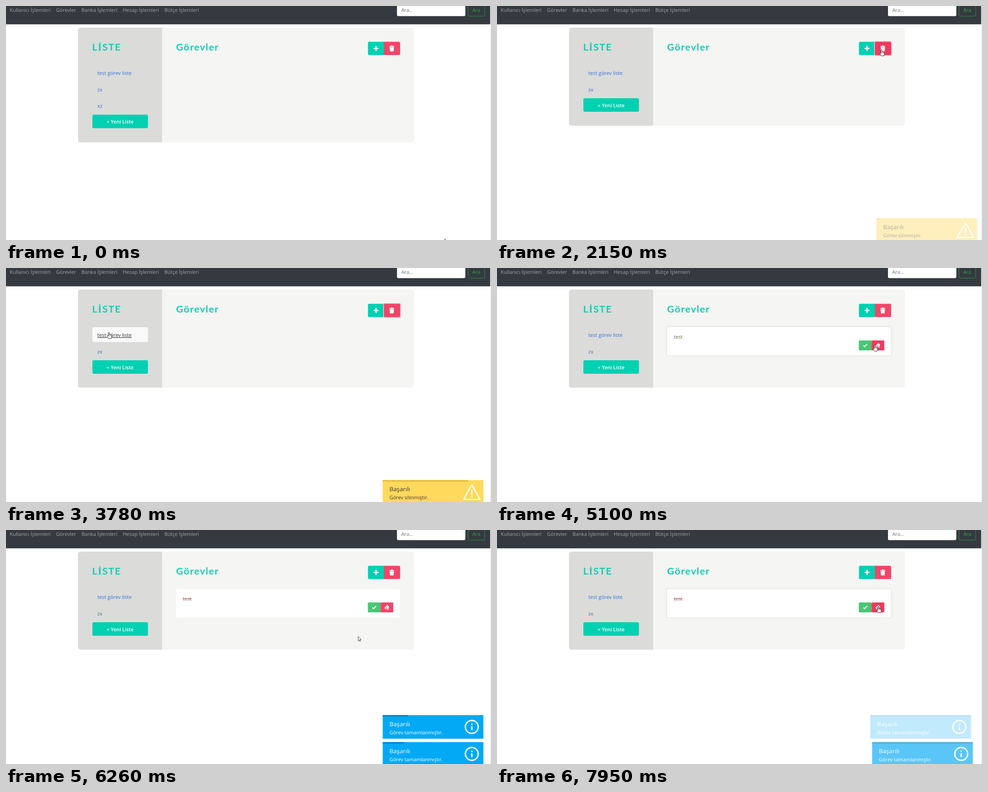
Recreate the animation shown at these times as an HTML page. Size 1078 by 520 pixels, loop 8000 ms.

```html
<!DOCTYPE html>
<html lang="tr">
<head>
<meta charset="utf-8">
<title>Görevler</title>
<style>
html, body { margin: 0; width: 100%; height: 100%; overflow: hidden; background: #fff; }
svg { display: block; font: 11.2px "Open Sans", sans-serif; }
.nav { fill: #a2a5a8; }
.head { font: 700 21.6px Lato, sans-serif; letter-spacing: 1.5px; fill: #13cdb3; }
.serif { font-family: "Liberation Serif", serif; }
.item { fill: #3273dc; font-size: 11.35px; }
.item rect { fill: none; }
.item.over text { fill: #363636; text-decoration: underline; }
.item.over rect { fill: #f9f9f9; }
.item.dim text { fill: #4270a8; }
.white { fill: #fff; }
.line { fill: none; stroke: #fff; }
.teal { fill: #00d1b2; }
.red { fill: #f14668; }
.green { fill: #48c774; }
.teal.over { fill: #00c4a7; }
.red.over { fill: #f03a5f; }
.green.over { fill: #3ec46d; }
.done { fill: #b0656c; text-decoration: line-through; }
.open { fill: #4d7340; }
.title { font-size: 13.5px; }
.msg { font-size: 11.1px; }
.warn { fill: #ffd95c; }
.warn .bar { fill: #e9bd40; }
.warn text { fill: #3a3a33; }
.info { fill: #03a9f4; }
.info .bar { fill: #0288d1; }
.info text { fill: #fff; }
</style>
</head>
<body>
<svg width="1078" height="520" viewBox="0 0 1078 520">
  <rect width="1076.5" height="40.7" fill="#343a40"/>
  <rect x="1076.5" width="1.5" height="520" fill="#ececec"/>
  <text class="nav" x="8.3" y="13">Kullanıcı İşlemleri<tspan dx="12">Görevler</tspan><tspan dx="12">Banka İşlemleri</tspan><tspan dx="12">Hesap İşlemleri</tspan><tspan dx="12">Bütçe İşlemleri</tspan></text>
  <rect class="white" x="869" y="-6" width="152" height="28.5" rx="3"/>
  <text x="878.5" y="13" fill="#6c757d">Ara...</text>
  <rect x="1026.9" y="-6" width="37" height="28.5" rx="3" fill="none" stroke="#28a745" stroke-width=".8"/>
  <text x="1036.5" y="13" fill="#28a745">Ara</text>

  <rect id="panel" x="160" y="48" width="747" rx="6" fill="#f5f5f3"/>
  <path id="side" fill="#dbdbd9"/>
  <text class="head" x="191.5" y="99">L<tspan class="serif">İ</tspan>STE</text>
  <text class="head" x="378" y="99">Görevler</text>
  <g id="list"></g>
  <g id="add">
    <rect class="teal" x="192" y="241.5" width="123.5" height="30" rx="3"/>
    <text class="white" x="253.7" y="261" text-anchor="middle" font-size="11.1" font-weight="600">+ Yeni Liste</text>
  </g>

  <path id="plus" class="teal" d="M840 79.5H807.5a3 3 0 0 0-3 3V106a3 3 0 0 0 3 3H840Z"/>
  <path class="line" stroke-width="2.6" d="M817 94.2H828M822.5 88.7V99.7"/>
  <rect id="ring" x="838.3" y="78" width="39.5" height="33" rx="3" fill="#f7bcc8"/>
  <path id="trash" class="red" d="M840 79.5H873a3 3 0 0 1 3 3V106a3 3 0 0 1-3 3H840Z"/>
  <path class="white" d="M852 89h3.2l.8-1.2h3l.8 1.2H863v1.7H852ZM852.7 91.6H862.3L861.7 99.6q-.1 1.4-1.4 1.4H854.7q-1.3 0-1.4-1.4Z"/>

  <g id="task">
    <rect id="glow" x="375" y="128.5" width="503.5" height="68" rx="6" fill="#ececeb"/>
    <rect class="white" x="378" y="131.5" width="497.7" height="62.8" rx="4"/>
    <text id="name" x="393" y="157">test</text>
    <rect id="check" class="green" x="804.3" y="161" width="28.5" height="22" rx="1.5"/>
    <path class="line" stroke-width="2" d="M814.3 172.2L817 175L822.8 168.8"/>
    <rect id="erase" class="red" x="832.5" y="161" width="28.3" height="22" rx="1.5"/>
    <path class="white" d="M841.5 172.6L847 167.2q.8-.7 1.6 0l2.7 2.7q.7.8 0 1.5L848 174.8H851.5V176.3H844.3L841.5 173.8Z"/>
    <path class="red" d="M843.3 173.4L845 171.8L847.2 174L846.2 174.9H844.7Z"/>
  </g>
  <g id="toasts"></g>
  <g id="cursor" stroke-linejoin="round">
    <path id="arrow" fill="#fff" stroke="#333" stroke-width=".9" d="M.4.3V10L2.6 8L4.1 11.4L5.7 10.7L4.2 7.4H7.2Z"/>
    <g id="hand" fill="#fff" stroke="#222">
      <path d="M-1.5 1.2C-1.5-.4 1-.4 1 1.2V5C3 4.5 6 5.2 6 7V10C6 12 5 12.3 4.6 13.8H-.8C-1.5 12-4 10-4 8.5C-4 7.2-2.4 7.2-1.5 8.6Z"/>
      <path fill="none" stroke-width=".5" d="M1 5V8M2.8 5.5V8M4.5 6V8"/>
    </g>
  </g>
</svg>
<script>
const LOOP = 8000, DELETED = 2020, SELECTED = 3900, DONE = 5690;
const ROW = 36.5, SHOW = 300, STAY = 2000, HIDE = 280, SHIFT = 10;

// Pointer moves: each eases to its point, rising by lift on the way
const home = { x: 975, y: 517 };
const moves = [
  { from: 60, to: 200, x: 199, y: 218, lift: 0 },
  { from: 960, to: 1570, x: 855, y: 97, lift: 48 },
  { from: 2650, to: 3740, x: 229, y: 143, lift: 0 },
  { from: 3960, to: 4960, x: 816, y: 171, lift: 20 },
  { from: 5030, to: 5100, x: 840, y: 171, lift: 0 },
  { from: 5210, to: 5570, x: 817, y: 170, lift: 0 },
  { from: 5750, to: 6770, x: 748, y: 302, lift: 0 },
  { from: 7340, to: 7900, x: 848, y: 170, lift: 60 }
];

const $ = id => document.getElementById(id);
const clamp = v => Math.max(0, Math.min(1, v));
const ease = v => { v = clamp(v); return v * v * (3 - 2 * v); };
const show = (el, on) => { el.style.display = on ? '' : 'none'; };

function group(parent, kind, html) {
  const g = document.createElementNS('http://www.w3.org/2000/svg', 'g');
  g.setAttribute('class', kind);
  g.innerHTML = html;
  parent.append(g);
  return g;
}

function pointer(t) {
  let { x, y } = home;
  for (const m of moves) {
    const k = ease((t - m.from) / (m.to - m.from));
    x += (m.x - x) * k;
    y += (m.y - y) * k - m.lift * Math.sin(Math.PI * k);
  }
  return [x, y];
}

const items = ['test görev liste', 'zx', 'xz'].map((label, i) => group($('list'), 'item',
  `<rect x="192" y="${131.5 + ROW * i}" width="123.5" height="33" rx="3"/><text x="203" y="${153 + ROW * i}">${label}</text>`));

const icons = {
  warn: '<path class="line" stroke-width="2.6" stroke-linejoin="round" d="M198 10.3L216.2 43H179.8Z"/><path class="line" stroke-width="2.6" d="M198 21V33M198 35.5V38.5"/>',
  info: '<circle class="line" cx="198" cy="26.3" r="14.3" stroke-width="3"/><path class="line" stroke-width="3.2" d="M198 25V33.5M198 19V22.2"/>'
};

function makeToast(kind, start, msg) {
  const g = group($('toasts'), kind, `<rect width="223.8" height="52.5"/><rect class="bar" height="3.6"/>
    <text class="title" x="15" y="25">Başarılı</text><text class="msg" x="15" y="42.5">${msg}</text>${icons[kind]}`);
  return { g, start, bar: g.querySelector('.bar') };
}
const toasts = [
  makeToast('warn', DELETED, 'Görev silinmiştir.'),
  makeToast('info', DONE + 10, 'Görev tamamlanmıştır.'),
  makeToast('info', DONE + 90, 'Görev tamamlanmıştır.')
];

function drawToast({ g, start, bar }, i, t) {
  const age = t - start - 60;
  const shown = ease((t - start) / SHOW), gone = ease((age - STAY) / HIDE);
  const next = toasts[i + 1];
  const lifted = next && t >= next.start;
  show(g, t >= start && gone < 1);
  g.setAttribute('opacity', shown * (1 - gone));
  g.setAttribute('transform', `translate(${837.3 + SHIFT * (1 - shown - gone)} ${lifted ? 411.3 : 471.3})`);
  bar.setAttribute('width', 223.8 * clamp(age / STAY));
}

function draw(t) {
  const [x, y] = pointer(t);
  const deleted = t >= DELETED, listed = t >= SELECTED;
  const bottom = deleted ? 266 : 303;

  $('panel').setAttribute('height', bottom - 48);
  $('side').setAttribute('d', `M347 48H166a6 6 0 0 0-6 6V${bottom - 6}a6 6 0 0 0 6 6H347Z`);
  $('add').setAttribute('transform', `translate(0 ${deleted ? -ROW : 0})`);
  show(items[2], !deleted);
  items[1].classList.toggle('dim', t >= 3600);
  show($('ring'), t >= DELETED - 60 && t < SELECTED - 50);
  show($('task'), listed);
  $('name').setAttribute('class', t >= DONE ? 'done' : 'open');

  const inside = el => {
    const b = el.getBBox();
    return b.width > 0 && x >= b.x && x < b.x + b.width && y >= b.y && y < b.y + b.height;
  };
  const links = [...items, $('plus'), $('trash'), $('check'), $('erase')];
  const target = links.findLast(el => el.style.display !== 'none' && (listed || !$('task').contains(el)) && inside(el));
  links.forEach(el => el.classList.toggle('over', el === target));
  show($('hand'), target);
  show($('arrow'), !target);
  show($('glow'), x >= 378 && x < 876 && y >= 131 && y < 194);

  toasts.forEach((toast, i) => drawToast(toast, i, t));
  $('cursor').setAttribute('transform', `translate(${x} ${y})`);
}

function tick() {
  draw(performance.now() % LOOP);
  requestAnimationFrame(tick);
}
tick();
</script>
</body>
</html>
```
